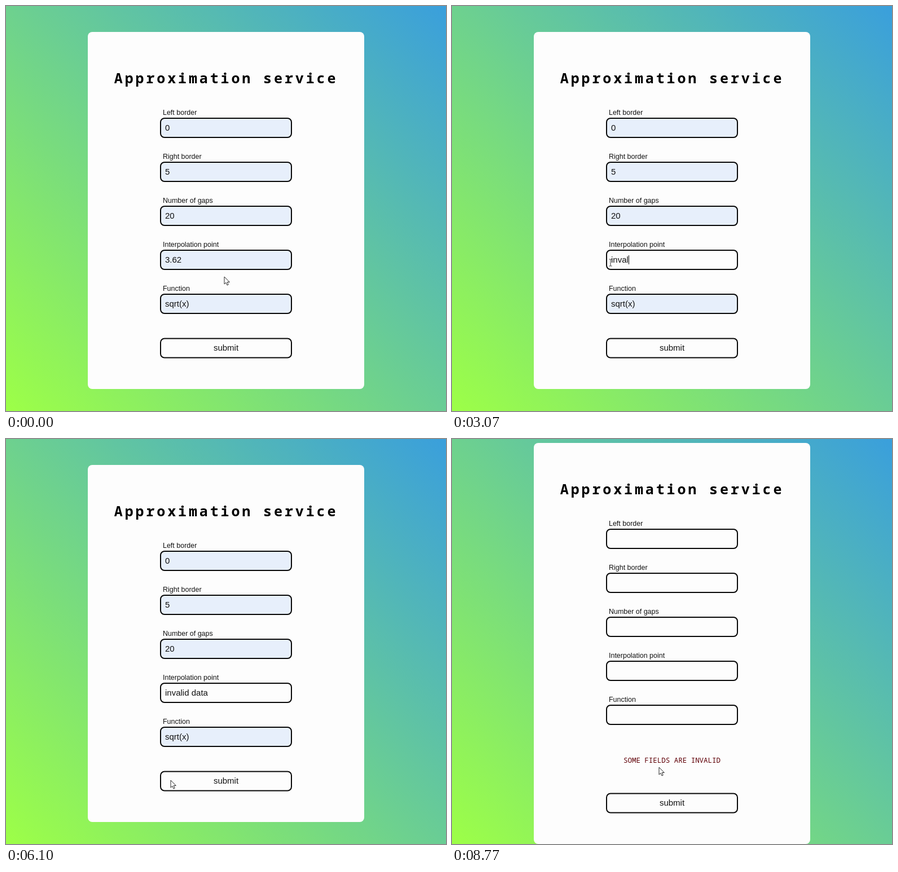
An HTML page for the animation above (8.81 s loop, 780x718 px).

```html
<!DOCTYPE html>
<html lang="en">
<head>
<meta charset="utf-8">
<title>Approximation service</title>
<style>
  html, body { margin: 0; width: 100%; height: 100%; overflow: hidden; }
  body { background: linear-gradient(45deg, #9dff47, #3a9fdc); }
  svg { display: block; width: 780px; height: 718px; }
  text { font: 15px "Liberation Sans", Arial, sans-serif; fill: #111; white-space: pre; }
  .label { font-size: 12.48px; }
  .title { font: bold 25px "Noto Sans Mono", monospace; letter-spacing: 3.88px; fill: #000; }
  .error { font: 500 12.48px "Noto Sans Mono", monospace; fill: #600008; }
  .box { fill: #fdfdfd; stroke: #080808; stroke-width: 2; }
  .filled { fill: #e7effb; }
  .selected { fill: #fff; }
</style>
</head>
<body>
<svg viewBox="0 0 780 718">
  <rect id="card" x="145" width="490" rx="8" fill="#fdfdfd"/>
  <g id="top">
    <text class="title" x="191.8" y="137">Approximation service</text>
  </g>
  <text id="error" class="error" x="390" y="574" text-anchor="middle">SOME FIELDS ARE INVALID</text>
  <g id="button">
    <rect class="box" x="274" y="589.5" width="232" height="34" rx="7"/>
    <text x="390" y="611" text-anchor="middle">submit</text>
  </g>
  <path id="arrow" d="M0 0V13L3 10.3L5 15L7.2 14L5.2 9.5H9.3Z" fill="#fff" stroke="#111" stroke-width=".9"/>
  <path id="beam" d="M-2.5-6H-.5L0-5.5L.5-6H2.5M0-5.5V5.5M-2.5 6H-.5L0 5.5L.5 6H2.5" fill="none" stroke="#333"/>
</svg>
<script>
  const LOOP = 8810, SUBMITTED = 6500, SHIFT = 39, TEXT_X = 282;
  const SELECT_FROM = 1000, SELECT_TO = 1500;
  const TYPE_START = 2400, TYPE_END = 4130, TYPED = "invalid data", OLD = "3.62";
  const FIELDS = [["Left border", "0"], ["Right border", "5"], ["Number of gaps", "20"],
    ["Interpolation point", OLD], ["Function", "sqrt(x)"]];

  // Pointer moves: start, end, destination
  const HOME = [387, 480];
  const MOVES = [[250, 850, 317, 453], [SELECT_FROM, SELECT_TO, 281, 455],
    [5150, 5900, 292, 605], [7950, 8720, 367, 582]];

  const $ = id => document.getElementById(id);
  const show = (el, on) => el.setAttribute("visibility", on ? "visible" : "hidden");
  const move = (el, x, y) => el.setAttribute("transform", `translate(${x} ${y})`);

  function add(parent, tag, attrs, text = "") {
    const el = document.createElementNS("http://www.w3.org/2000/svg", tag);
    for (const key in attrs) el.setAttribute(key, attrs[key]);
    el.textContent = text;
    return parent.appendChild(el);
  }

  const fields = FIELDS.map(([label, value], i) => {
    const y = 78 * i;
    add($("top"), "text", { class: "label", x: 278, y: 192.7 + y }, label);
    const box = add($("top"), "rect", { class: "box", x: 274, y: 199 + y, width: 232, height: 34, rx: 7 });
    const mark = add($("top"), "rect", { y: 208 + y, height: 17, fill: "#338fff" });
    const text = add($("top"), "text", { x: TEXT_X, y: 221 + y });
    const plain = add(text, "tspan", {}, value);
    const selected = add(text, "tspan", { class: "selected" });
    return { box, mark, text, plain, selected, value };
  });
  const edited = fields[3];
  const caret = add($("top"), "rect", { y: 442, width: 1, height: 16, fill: "#111" });

  function pointerAt(t) {
    let [x, y] = HOME;
    for (const [from, to, nx, ny] of MOVES) {
      const p = Math.min(1, Math.max(0, (t - from) / (to - from)));
      const k = p * p * (3 - 2 * p);
      x += (nx - x) * k;
      y += (ny - y) * k;
    }
    return [x, y];
  }

  const typedCount = t => t < TYPE_START ? 0
    : Math.min(TYPED.length, 1 + Math.floor((t - TYPE_START) / (TYPE_END - TYPE_START) * (TYPED.length - 1)));

  function drawEdited(t, x, done) {
    const count = typedCount(t);
    const value = done ? "" : count ? TYPED.slice(0, count) : OLD;
    edited.plain.textContent = value;
    edited.selected.textContent = "";
    const width = edited.text.getComputedTextLength();

    let start = value.length, left = width;
    if (!done && !count && t >= SELECT_FROM) {
      while (start > 0) {
        const prev = edited.text.getSubStringLength(0, start) - edited.text.getSubStringLength(start - 1, 1);
        if (x - TEXT_X > (left + prev) / 2) break;
        left = prev;
        start--;
      }
      edited.plain.textContent = value.slice(0, start);
      edited.selected.textContent = value.slice(start);
    }
    edited.mark.setAttribute("x", TEXT_X + left);
    edited.mark.setAttribute("width", width - left);

    const idle = t >= TYPE_END ? t - TYPE_END : 0;
    const focused = t >= SELECT_FROM && start === value.length && t < 6130;
    show(caret, focused && !done && idle % 1000 < 500);
    caret.setAttribute("x", Math.round(TEXT_X + width));
  }

  function render(t) {
    const done = t >= SUBMITTED, offset = done ? SHIFT : 0;
    $("card").setAttribute("y", 46 - offset);
    $("card").setAttribute("height", 633 + 2 * offset);
    move($("top"), 0, -offset);
    move($("button"), 0, offset);
    show($("error"), done);

    for (const f of fields) {
      f.plain.textContent = done ? "" : f.value;
      f.box.classList.toggle("filled", !done && (f !== edited || t < TYPE_START));
    }
    const [x, y] = pointerAt(t);
    drawEdited(t, x, done);

    const overField = !done && x > 273 && x < 507 && y > 198 && y < 546 && (y - 198) % 78 < 36;
    show($("beam"), overField);
    show($("arrow"), !overField);
    move($("beam"), x, y);
    move($("arrow"), x, y);
  }

  const begin = performance.now();
  function tick() {
    render((performance.now() - begin) % LOOP);
    requestAnimationFrame(tick);
  }
  tick();
</script>
</body>
</html>
```
